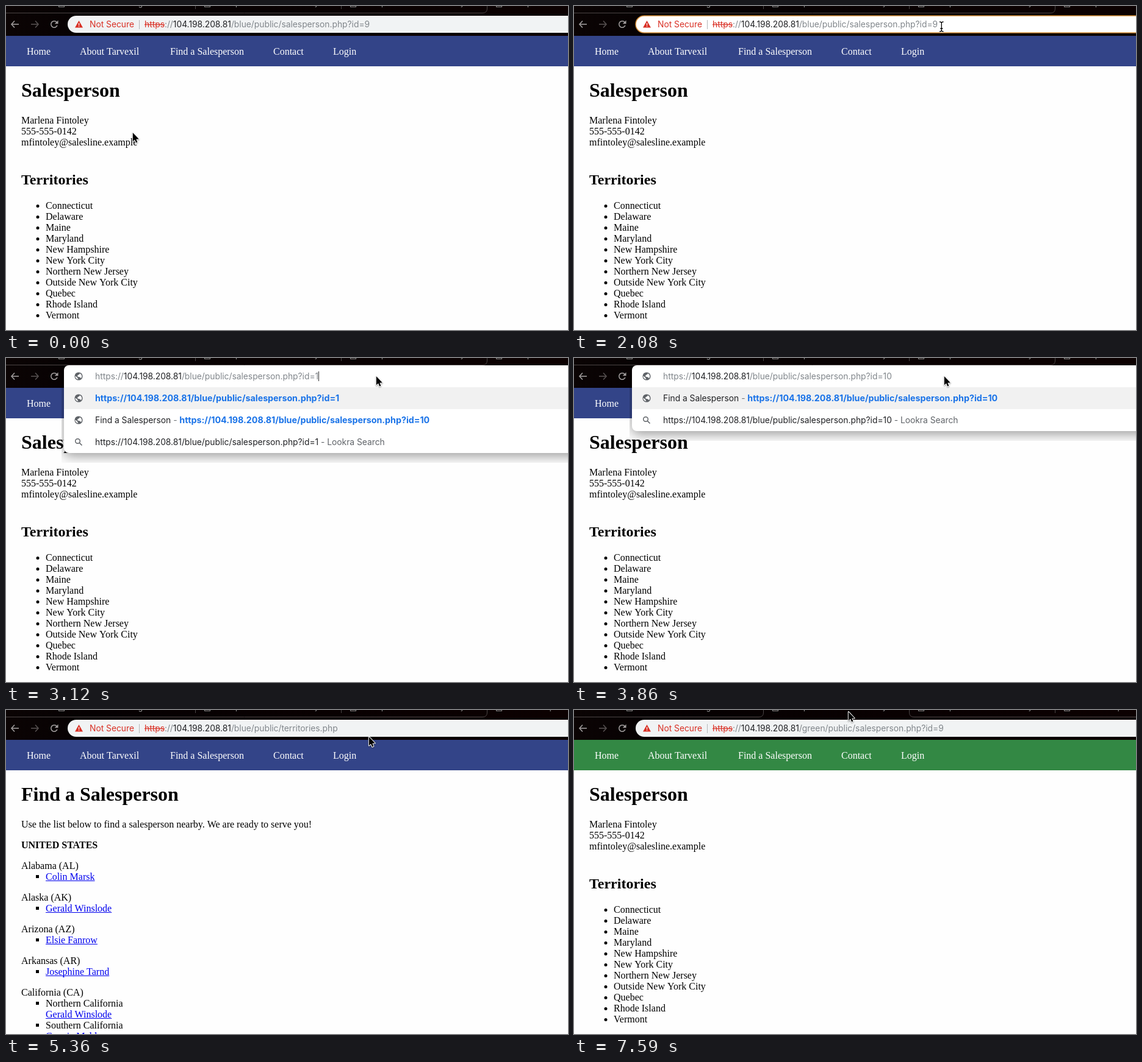
Recreate the animation shown at these times as an HTML page with a canvas. Size 921x532 px, loop 8000 ms.

```html
<!DOCTYPE html>
<html lang="en">
<head>
<meta charset="utf-8">
<title>Browser session</title>
<style>
html, body { margin: 0; width: 100%; height: 100%; overflow: hidden; background: #fefefe; }
canvas { display: block; }
</style>
</head>
<body>
<canvas id="stage" width="921" height="532"></canvas>
<script>
const W = 921, H = 532, LOOP = 8000;
const stage = document.getElementById('stage').getContext('2d');
const layer = new OffscreenCanvas(W, H).getContext('2d');
let ctx = stage;
const SERIF = '"Liberation Serif", serif', SANS = 'Inter, Roboto, sans-serif';
const UI = `13.8px ${SANS}`, UI_BOLD = `bold 14.25px ${SANS}`;
const INK = '#202124', GREY = '#80868b', LINK = '#1a73e8', RED = '#d93025';

const HOST = '104.198.208.81';
const PATH = '/blue/public/salesperson.php?id=';
const FULL = 'https://' + HOST + PATH;
const PERSON = 'Marlena Fintoley';
const TERRITORIES = ['Connecticut', 'Delaware', 'Maine', 'Maryland', 'New Hampshire', 'New York City',
  'Northern New Jersey', 'Outside New York City', 'Quebec', 'Rhode Island', 'Vermont'];

// [start ms, x, y, is text cursor]
const POINTER = [
  [0, 207, 208, 0], [150, 209, 223, 1], [450, 262, 190, 0], [600, 340, 150, 0], [750, 450, 105, 0],
  [900, 570, 60, 0], [1050, 630, 33, 1], [1200, 637, 31, 1], [1340, 622, 32, 1], [1490, 602, 34, 1],
  [1630, 600, 36, 1], [1780, 597, 37, 1], [2080, 602, 34, 1], [2230, 607, 31, 1], [2820, 606, 30, 0],
  [4460, 607, 31, 1], [5060, 604, 36, 1], [5210, 599, 38, 1], [5360, 594, 44, 0], [5810, 540, 120, 0],
  [5960, 430, 220, 0], [6110, 300, 310, 0], [6250, 250, 375, 0], [6400, 430, 290, 0], [6550, 593, 197, 0],
  [6700, 585, 130, 0], [6840, 560, 72, 0], [6990, 535, 48, 0], [7140, 500, 25, 0], [7290, 470, 8, 0],
  [7440, 455, 4, 0], [7590, 449, 3, 0]
];

const within = (t, from, to) => t >= from && t < to;

function rect(x, y, w, h, color) {
  ctx.fillStyle = color;
  ctx.fillRect(x, y, w, h);
}

function disc(x, y, r, color) {
  ctx.fillStyle = color;
  ctx.beginPath();
  ctx.arc(x, y, r, 0, Math.PI * 2);
  ctx.fill();
}

function line(points, color, width) {
  ctx.strokeStyle = color;
  ctx.lineWidth = width;
  ctx.beginPath();
  points.forEach(([x, y]) => ctx.lineTo(x, y));
  ctx.stroke();
}

// Draws text and returns the x where it ends.
function text(str, x, y, font, color) {
  ctx.font = font;
  ctx.fillStyle = color;
  ctx.fillText(str, x, y);
  return x + ctx.measureText(str).width;
}

function serif(str, x, y, color = '#000', size = 16, weight = '') {
  return text(str, x, y, `${weight} ${size}px ${SERIF}`, color);
}

// Each run is [text, color, bold].
function runs(list, x, y) {
  for (const [str, color, bold] of list) x = text(str, x, y, bold ? UI_BOLD : UI, color);
  return x;
}

function nav(color) {
  rect(0, 49, W, 50, color);
  const items = { Home: 34, 'About Tarvexil': 121, 'Find a Salesperson': 269, Contact: 438, Login: 536 };
  for (const label in items) serif(label, items[label], 80, '#fff');
}

function personPage() {
  serif('Salesperson', 25, 149, '#000', 32, 'bold');
  [PERSON, '555-555-0142', 'mfintoley@salesline.example'].forEach((s, i) => serif(s, 25, 193 + 18 * i));
  serif('Territories', 25, 293, '#000', 24, 'bold');
  TERRITORIES.forEach((name, i) => {
    disc(52, 328.5 + 18 * i, 2.5, '#000');
    serif(name, 65, 333 + 18 * i);
  });
}

function pageLink(str, y) {
  const end = serif(str, 65, y, '#0000ee');
  rect(65, y + 1, end - 65, 1, '#0000ee');
}

const bullet = y => rect(49, y - 8, 5, 5, '#000');

function territoryPage() {
  serif('Find a Salesperson', 25, 149, '#000', 32, 'bold');
  serif('Use the list below to find a salesperson nearby. We are ready to serve you!', 25, 193);
  serif('UNITED STATES', 25, 227, '#000', 16, 'bold');
  [['Alabama (AL)', 'Colin Marsk'], ['Alaska (AK)', 'Gerald Winslode'],
   ['Arizona (AZ)', 'Elsie Fanrow'], ['Arkansas (AR)', 'Josephine Tarnd']].forEach(([state, name], i) => {
    const y = 261 + 52 * i;
    serif(state, 25, y);
    bullet(y + 18);
    pageLink(name, y + 18);
  });
  serif('California (CA)', 25, 469);
  [['Northern California', 'Gerald Winslode'], ['Southern California', 'Connie Maldrez']].forEach(([area, name], i) => {
    const y = 487 + 36 * i;
    bullet(y);
    serif(area, 65, y);
    pageLink(name, y + 18);
  });
}

function tabStrip(t, green) {
  const shade = ctx.createLinearGradient(0, 0, W, 0);
  shade.addColorStop(0, '#0b0404');
  shade.addColorStop(0.15, '#060102');
  shade.addColorStop(1, '#0c0101');
  rect(0, 0, W, 49, shade);

  const last = t >= 4910 ? 'Find a Salesperson' : 'Salesperson: ' + PERSON;
  const titles = ['Notes on web testing', 'Salesperson: ' + PERSON, 'Salesperson: ' + PERSON, last];
  titles.forEach((title, i) => {
    const x = 87 + 239 * i;
    text(title, x + 20, 0, `11.7px ${SANS}`, '#a0a0a0');
    if (i === 3 && within(t, 4310, 4910)) return;
    ctx.strokeStyle = '#8a8a8a';
    ctx.lineWidth = 1;
    ctx.strokeRect(x - 0.5, -8.5, 9, 10);
  });

  const left = green ? 310 : 788;
  ctx.strokeStyle = '#4a4545';
  ctx.lineWidth = 1;
  ctx.beginPath();
  ctx.moveTo(0, 11.5);
  ctx.lineTo(left - 7, 11.5);
  ctx.quadraticCurveTo(left + 0.5, 11.5, left + 0.5, 4);
  ctx.lineTo(left + 0.5, 0);
  if (green) {
    ctx.moveTo(549.5, 0);
    ctx.lineTo(549.5, 4);
    ctx.quadraticCurveTo(549.5, 11.5, 557, 11.5);
    ctx.lineTo(W, 11.5);
  }
  ctx.stroke();
  (green ? [788] : [310, 549]).forEach(x => rect(x, 0, 1, 5, '#4a4545'));
}

function toolbarIcons(loading) {
  const arrow = (x, dir, color) => {
    line([[x - 6, 30], [x + 6, 30]], color, 1.6);
    line([[x + dir, 24.5], [x + 6 * dir, 30], [x + dir, 35.5]], color, 1.6);
  };
  arrow(15, -1, '#a09c9c');
  arrow(47, 1, '#565050');
  const color = '#a09c9c';
  if (loading) {
    line([[74, 25], [84, 35]], color, 1.7);
    line([[84, 25], [74, 35]], color, 1.7);
    return;
  }
  ctx.strokeStyle = color;
  ctx.lineWidth = 1.6;
  ctx.beginPath();
  ctx.arc(79, 30, 5.2, 0.35, Math.PI * 1.78);
  ctx.stroke();
  ctx.fillStyle = color;
  ctx.beginPath();
  ctx.moveTo(85.5, 23.5);
  ctx.lineTo(85.5, 29.3);
  ctx.lineTo(79.7, 29.3);
  ctx.fill();
}

function globe(y) {
  disc(119, y, 6.6, '#5f6368');
  ctx.fillStyle = '#fff';
  ctx.beginPath();
  [[-5.2, -0.6], [-1.8, 2.6], [-0.8, 5.2], [-3.6, 4], [-5.4, 1.4]].forEach(([a, b]) => ctx.lineTo(119 + a, y + b));
  ctx.fill();
  ctx.beginPath();
  [[1.8, -5], [4.6, -2.6], [5.3, 0.4], [4, 3.6], [2.6, 1.8], [-1.8, 0.4], [-1.9, -1.2], [-0.2, -2.6], [1.6, -3.4]]
    .forEach(([a, b]) => ctx.lineTo(119 + a, y + b));
  ctx.fill();
}

function magnifier(y) {
  ctx.strokeStyle = '#5f6368';
  ctx.lineWidth = 1.5;
  ctx.beginPath();
  ctx.arc(117.5, y - 1.5, 3.8, 0, Math.PI * 2);
  ctx.moveTo(120.4, y + 1.4);
  ctx.lineTo(124.5, y + 5.5);
  ctx.stroke();
}

function infoIcon() {
  ctx.strokeStyle = '#5f6368';
  ctx.lineWidth = 1.3;
  ctx.beginPath();
  ctx.arc(119, 30, 6, 0, Math.PI * 2);
  ctx.stroke();
  rect(118.3, 29, 1.4, 4.4, '#5f6368');
  rect(118.3, 26.5, 1.4, 1.5, '#5f6368');
}

function warningChip() {
  ctx.fillStyle = RED;
  ctx.beginPath();
  ctx.moveTo(119.5, 24);
  ctx.lineTo(126, 35.5);
  ctx.lineTo(113, 35.5);
  ctx.fill();
  rect(118.9, 28, 1.3, 3.6, '#fff');
  rect(118.9, 32.6, 1.3, 1.3, '#fff');
  text('Not Secure', 137, 35, UI, RED);
  rect(218, 23, 1, 15, '#b4b6b9');
}

function addressPill(focused, ring) {
  ctx.fillStyle = focused ? '#fff' : '#f1f3f4';
  ctx.beginPath();
  ctx.roundRect(101, 16, W, 28, 14);
  ctx.fill();
  if (ring) {
    ctx.strokeStyle = '#d08a35';
    ctx.lineWidth = 1.5;
    ctx.stroke();
  }
}

function securedUrl(path, selected) {
  const width = str => (ctx.font = UI, ctx.measureText(str).width);
  if (selected) rect(227, 21, width('https://' + HOST + path) + 1, 18, '#ffe2b7');
  const tone = color => selected ? '#42382c' : color;
  runs([['https', tone(RED)], ['://', tone(GREY)], [HOST, tone(INK)], [path, tone(GREY)]], 227, 35);
  rect(227, 30, width('https'), 1.2, tone(RED));
}

function typedUrl(x, path) {
  return runs([['https://', GREY], [HOST, INK], [path, GREY]], x, 35);
}

function suggestions(t) {
  const dash = [' - ', '#70757a'];
  const person = (name, id, bold) => [['Salesperson', INK, bold], [': ' + name, INK], dash, [FULL, LINK, true], [id, LINK]];
  const search = id => [[FULL + id, INK], [' - Lookra Search', '#5f6368']];
  const find = [['Find a Salesperson', INK], dash, [FULL + '10', LINK, true]];
  if (t < 3120) return [
    [[FULL, LINK, true]], person(PERSON, '9'), person('Lon Tasker', '5'), person('Gerald Winslode', '4'),
    person('Connie Maldrez', '2', true), person('Elsie Fanrow', '3', true)
  ];
  if (t < 3420) return [[[FULL + '1', LINK, true]], find, search('1')];
  return [find, search('10')];
}

// Composed on its own layer so that it fades as one piece.
function popup(t, alpha) {
  const rows = suggestions(t);
  const height = 36 + 36 * rows.length;
  ctx = layer;
  ctx.clearRect(0, 0, W, H);
  ctx.save();
  ctx.beginPath();
  ctx.rect(91, 12, W, height + 16);
  ctx.clip();
  ctx.shadowColor = 'rgba(0,0,0,.4)';
  ctx.shadowBlur = 20;
  ctx.shadowOffsetY = 5;
  ctx.fillStyle = '#fff';
  ctx.beginPath();
  ctx.roundRect(95, 12, W, height, 8);
  ctx.fill();
  ctx.restore();
  if (alpha === 1) rect(95, 48, W, 36, '#f1f1f1');
  rows.forEach((row, i) => {
    const y = 66 + 36 * i;
    const isSearch = t >= 3120 && i === rows.length - 1;
    (isSearch ? magnifier : globe)(y);
    runs(row, 146, y + 5);
  });
  ctx = stage;
  ctx.globalAlpha = alpha;
  ctx.drawImage(layer.canvas, 0, 0);
  ctx.globalAlpha = 1;
}

function addressBar(t, green) {
  const editing = within(t, 2680, 4310);
  const loading = within(t, 4310, 4910);
  const open = within(t, 2820, 4310);
  if (open) popup(t, 1);
  else if (within(t, 2680, 2820) || within(t, 4310, 4460)) popup(t, 0.15);

  const ring = within(t, 1050, 2680);
  if (!open) addressPill(ring || editing, ring);
  if (editing) {
    globe(30);
    const id = t < 3120 ? '' : t < 3420 ? '1' : '10';
    const end = typedUrl(146, PATH + id);
    if (t < 3860) rect(Math.round(end), 22, 1, 16, '#333');
  } else if (loading) {
    infoIcon();
    typedUrl(135, PATH + '10');
  } else {
    warningChip();
    const path = green ? '/green/public/salesperson.php?id=9' : t >= 4910 ? '/blue/public/territories.php' : PATH + '9';
    securedUrl(path, within(t, 1050, 1630));
    if (within(t, 1630, 2080) || within(t, 2230, 2680)) rect(596, 22, 1, 16, '#333');
  }
}

function pointer(t) {
  const [, x, y, isText] = POINTER.filter(key => key[0] <= t).pop();
  ctx.save();
  ctx.translate(x, y);
  ctx.lineJoin = 'round';
  if (isText) {
    for (const [color, width] of [['rgba(255,255,255,.8)', 3], ['#000', 1.3]]) {
      ctx.strokeStyle = color;
      ctx.lineWidth = width;
      ctx.beginPath();
      for (const s of [-1, 1]) {
        ctx.moveTo(-3, 8 * s);
        ctx.quadraticCurveTo(0, 8 * s, 0.3, 6 * s);
        ctx.quadraticCurveTo(0.5, 8 * s, 3.5, 8 * s);
      }
      ctx.moveTo(0.3, -6.5);
      ctx.lineTo(0.3, 6.5);
      ctx.moveTo(-1.8, 3);
      ctx.lineTo(2.4, 3);
      ctx.stroke();
    }
  } else {
    ctx.beginPath();
    [[0.8, 0], [0.8, 14.5], [4, 11.6], [6.2, 16.6], [8.4, 15.6], [6.3, 10.8], [10.8, 10.6]].forEach(p => ctx.lineTo(...p));
    ctx.closePath();
    ctx.shadowColor = 'rgba(0,0,0,.4)';
    ctx.shadowBlur = 2;
    ctx.shadowOffsetY = 1;
    ctx.strokeStyle = '#fff';
    ctx.lineWidth = 2;
    ctx.stroke();
    ctx.shadowColor = 'transparent';
    ctx.fillStyle = '#000';
    ctx.fill();
  }
  ctx.restore();
}

function draw(t) {
  const green = t >= 7290;
  rect(0, 0, W, H, '#fefefe');
  if (within(t, 4910, 7290)) territoryPage();
  else personPage();
  nav(green ? '#338844' : '#334488');
  tabStrip(t, green);
  toolbarIcons(within(t, 4310, 4910));
  addressBar(t, green);
  pointer(t);
}

let start;
function tick(now) {
  start ??= now;
  draw((now - start) % LOOP);
  requestAnimationFrame(tick);
}
requestAnimationFrame(tick);
</script>
</body>
</html>
```
